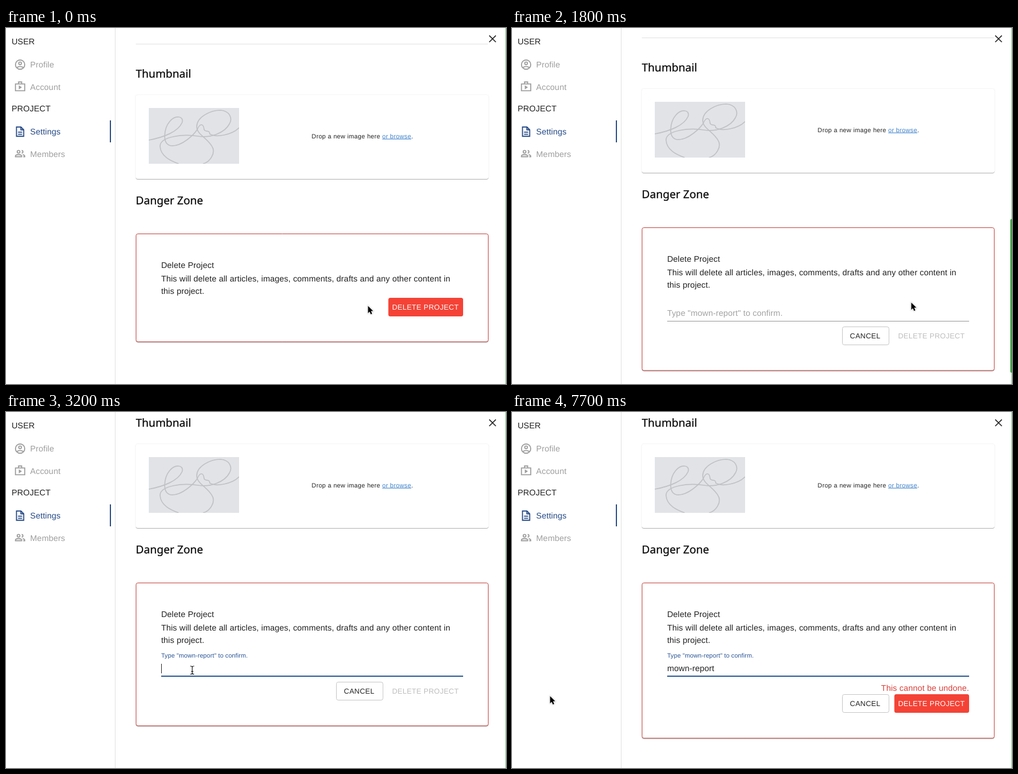
Recreate the animation shown at these times as an HTML page. Size 886x632 px, loop 8000 ms.

```html
<!DOCTYPE html>
<html lang="en">
<head>
<meta charset="utf-8">
<title>Project settings</title>
<style>
html, body { margin: 0; width: 100%; height: 100%; overflow: hidden; background: #fff; }
svg { display: block; width: 886px; height: 632px; }
text { font: 14.64px 'Liberation Sans', Arial, sans-serif; letter-spacing: .137px; fill: #212121; text-rendering: geometricPrecision; white-space: pre; }
.heading { font: 19.4px 'Noto Sans', 'Open Sans', sans-serif; letter-spacing: .05px; fill: #0c0c0c; stroke: #0c0c0c; stroke-width: .3; }
.caption { font-size: 10.98px; letter-spacing: .366px; }
.button { font-size: 12.81px; letter-spacing: .366px; }
.link { fill: #3f82cc; text-decoration: underline; }
.muted text { fill: #9e9e9e; }
.active text { fill: #264a86; }
.icon { fill: none; stroke: #9e9e9e; stroke-width: 2; }
.active .icon { stroke: #264a86; }
.paper { fill: #fff; filter: drop-shadow(0 1px 0 rgba(0,0,0,.28)) drop-shadow(0 .5px 1px rgba(0,0,0,.1)); }
.doodle { fill: none; stroke: #bfc1c5; stroke-width: 1.7; }

/* One shared 8 s timeline; values hold unless a keyframe sets an easing. */
.anim { animation: 8s step-end infinite; }
#page { animation-name: scroll; }
#thumb { animation-name: thumb; }
#danger { animation-name: grow; }
#actions { animation-name: drop; }
#delete { animation-name: delete; }
#deleteText { animation-name: deleteText; }
#ripple { animation-name: ripple; }
#confirm, #cancel { animation-name: confirm; }
#warning { animation-name: warning; fill: #d9403a; }
#label { animation-name: label; }
#line { animation-name: line; }
#focusLine { animation-name: focusLine; transform-origin: 542.5px 531px; }
#typing { animation-name: typing; }
#caret { animation-name: caret; }
#pointer { animation-name: pointer; animation-timing-function: linear; }
#arrow { animation-name: arrow; }
#beam { animation-name: beam; }

@keyframes scroll {
  0% { transform: none; }
  22.44% { transform: translateY(-11px); }
  23.07% { transform: translateY(-42px); }
  23.7%, 100% { transform: translateY(-62px); }
}
@keyframes thumb {
  0% { opacity: 0; transform: translateY(5px); }
  22.44% { opacity: 1; transform: translateY(5px); }
  23.07% { opacity: 1; transform: translateY(19px); }
  23.7% { opacity: 1; transform: translateY(28px); }
  29.3% { opacity: 1; transform: translateY(28px); animation-timing-function: linear; }
  32%, 100% { opacity: 0; transform: translateY(28px); }
}
@keyframes grow {
  0% { height: 191.5px; }
  13.1% { height: 253.5px; }
  89.95%, 100% { height: 275.5px; }
}
@keyframes drop {
  0% { transform: none; }
  13.1% { transform: translateY(62px); }
  89.95%, 100% { transform: translateY(84px); }
}
@keyframes delete {
  0% { fill: #f44336; fill-opacity: 1; }
  6.85% { fill: #f44336; fill-opacity: 1; animation-timing-function: ease-out; }
  8.7% { fill: #d32f2f; fill-opacity: 1; }
  13.1% { fill: #d32f2f; fill-opacity: 1; animation-timing-function: ease-out; }
  15.6% { fill: #f44336; fill-opacity: 0; }
  89.95% { fill: #f44336; fill-opacity: 0; animation-timing-function: ease-out; }
  92.5%, 100% { fill: #f44336; fill-opacity: 1; }
}
@keyframes deleteText {
  0% { fill: #fff; }
  13.1% { fill: #bdbdbd; }
  89.95%, 100% { fill: #fff; }
}
@keyframes ripple {
  0% { r: 0; opacity: 0; }
  10.6% { r: 4px; opacity: .1; animation-timing-function: linear; }
  12.5% { r: 23px; opacity: .2; animation-timing-function: linear; }
  13.09% { r: 33px; opacity: .22; }
  13.1%, 100% { r: 33px; opacity: 0; }
}
@keyframes confirm { 0% { opacity: 0; } 13.1%, 100% { opacity: 1; } }
@keyframes warning { 0% { opacity: 0; } 89.95%, 100% { opacity: 1; } }
@keyframes label {
  0% { transform: translate(274.9px, 510px); fill: #a2a2a2; }
  36.9% { transform: translate(274.9px, 510px); fill: #a2a2a2; animation-timing-function: cubic-bezier(0, 0, .2, 1); }
  39.3%, 100% { transform: translate(274.9px, 489.2px) scale(.75); fill: #2b5596; }
}
@keyframes line {
  0% { fill: #949494; }
  34% { fill: #949494; animation-timing-function: ease-out; }
  36% { fill: #222; }
  39.3%, 100% { fill: #949494; }
}
@keyframes focusLine {
  0% { transform: scaleX(0); }
  36.9% { transform: scaleX(0); animation-timing-function: cubic-bezier(0, 0, .2, 1); }
  39.3%, 100% { transform: none; }
}
@keyframes typing {
  0% { transform: none; }
  49.95% { transform: translateX(12.3px); }
  54.32% { transform: translateX(20.6px); }
  58.7% { transform: translateX(31.3px); }
  59.95% { transform: translateX(39.6px); }
  68.7% { transform: translateX(44.6px); }
  75.57% { transform: translateX(49.6px); }
  77.45% { transform: translateX(57.9px); }
  79.32% { transform: translateX(66.2px); }
  81.82% { transform: translateX(74.5px); }
  84.95% { transform: translateX(79.5px); }
  89.95%, 100% { transform: translateX(84.5px); }
}
@keyframes caret {
  0%, 44.95%, 66.8%, 74.95% { opacity: 0; }
  36.9%, 49.95%, 68.7%, 75.57% { opacity: 1; }
  96.2%, 100% { opacity: 0; }
}
@keyframes pointer {
  0%, 6.2% { transform: translate(641px, 493px); }
  8.7%, 29.3% { transform: translate(707px, 487px); animation-timing-function: ease-in; }
  32% { transform: translate(600px, 472px); animation-timing-function: ease-out; }
  35.6%, 40% { transform: translate(330px, 458px); animation-timing-function: ease-in-out; }
  44.3%, 100% { transform: translate(67px, 504px); }
}
@keyframes arrow {
  0%, 41.6% { opacity: 1; }
  32.5%, 54.32% { opacity: 0; }
  96.2%, 100% { opacity: 1; }
}
@keyframes beam { 0%, 41.6%, 100% { opacity: 0; } 32.5% { opacity: 1; } }
</style>
</head>
<body>
<svg viewBox="0 0 886 632">
  <defs>
    <clipPath id="buttonClip"><rect x="677.5" y="479" width="132.5" height="33" rx="3.5"/></clipPath>
    <clipPath id="imageClip"><rect x="253" y="142" width="160" height="99"/></clipPath>
  </defs>

  <g id="page" class="anim">
    <path d="M230 28.5H854" stroke="#e0e0e0"/>
    <text class="heading" x="230" y="88">Thumbnail</text>
    <rect class="paper" x="230" y="119" width="625" height="149" rx="3.7"/>
    <g clip-path="url(#imageClip)">
      <rect x="253" y="142" width="160" height="99" fill="#e1e3e7"/>
      <path class="doodle" d="M253 199C280 194 305 184 312 168C316 156 300 154 290 166C280 178 276 206 292 209C312 211 334 188 339 180C344 168 350 170 351 180C353 186 361 180 361 188C372 195 400 190 413 177"/>
      <path class="doodle" d="M349 241C362 238 371 222 366 212C358 195 338 190 338 175C338 158 362 146 380 146C396 147 402 160 396 170C388 186 362 196 340 192C315 188 273 192 273 210C274 228 292 236 306 241"/>
    </g>
    <text class="caption" x="541.6" y="195.6">Drop a new image here <tspan class="link">or browse</tspan>.</text>
    <text class="heading" x="230" y="313">Danger Zone</text>

    <rect id="danger" class="paper anim" x="230.5" y="365.5" width="624" height="191.5" rx="3.2" stroke="#c5433c"/>
    <text x="274.9" y="426.4">Delete Project</text>
    <text x="274.9" y="450.3">This will delete all articles, images, comments, drafts and any other content in</text>
    <text x="274.9" y="472.3">this project.</text>

    <g id="confirm" class="anim">
      <text x="274.9" y="522">mown-report</text>
      <g id="typing" class="anim">
        <rect x="274.5" y="507" width="100" height="21" fill="#fff"/>
        <rect id="caret" class="anim" x="275" y="509" width="1" height="17" fill="#222"/>
      </g>
      <text id="label" class="anim" y="12.4">Type "mown-report" to confirm.</text>
      <rect id="line" class="anim" x="275" y="531" width="535" height="1"/>
      <rect id="focusLine" class="anim" x="275" y="530" width="535" height="2" fill="#245590"/>
    </g>
    <text id="warning" class="anim" x="810" y="557" text-anchor="end">This cannot be undone.</text>

    <g id="actions" class="anim">
      <g id="cancel" class="anim">
        <rect x="585.5" y="479.5" width="82.5" height="32" rx="3.2" fill="#fff" stroke="#c4c4c4"/>
        <text class="button" x="598.8" y="500.2">CANCEL</text>
      </g>
      <rect id="delete" class="anim" x="677.5" y="479" width="132.5" height="33" rx="3.5"/>
      <g clip-path="url(#buttonClip)"><circle id="ripple" class="anim" cx="707" cy="489" fill="#fff"/></g>
      <text id="deleteText" class="button anim" x="684.2" y="500.2">DELETE PROJECT</text>
    </g>
  </g>

  <rect width="193" height="632" fill="#fff"/>
  <path d="M193.5 0V632" stroke="#e0e0e0"/>
  <text x="9.9" y="29">USER</text>
  <g class="muted">
    <g class="icon" transform="translate(14 54) scale(.915)">
      <circle cx="12" cy="12" r="9"/><circle cx="12" cy="9.5" r="2.6"/><path d="M5.8 18.2C8 15 16 15 18.2 18.2"/>
    </g>
    <text x="42.8" y="70.3">Profile</text>
    <g class="icon" transform="translate(14 93) scale(.915)">
      <path d="M3 7H21V20H3ZM9 7V3H15V7"/><path d="M9.5 9.5V17.5L15.5 13.5Z" fill="#9e9e9e" stroke="none"/>
    </g>
    <text x="42.8" y="109.7">Account</text>
  </g>
  <text x="9.9" y="148.3">PROJECT</text>
  <g class="active">
    <g class="icon" transform="translate(14 173) scale(.915)">
      <path d="M5 3H13.6L19 8.4V21H5ZM13.5 3V8.5H19M8 13H16M8 17H16"/>
    </g>
    <text x="42.8" y="189.3">Settings</text>
    <rect x="184" y="164" width="2" height="39" fill="#264a86"/>
  </g>
  <g class="muted">
    <g class="icon" transform="translate(14 212) scale(.915)">
      <circle cx="9" cy="8.5" r="2.6"/><path d="M3 18V16.8C3 13 15 13 15 16.8V18ZM15 6A2.5 2.5 0 0 1 15 11M17 14C19.5 14.5 21 15.5 21 17V18H18"/>
    </g>
    <text x="42.8" y="228.7">Members</text>
  </g>

  <path d="M856.3 13.3L868 25M868 13.3L856.3 25" stroke="#222" stroke-width="1.7"/>
  <rect x="885" width="1" height="632" fill="#82c785"/>
  <rect id="thumb" class="anim" x="883" y="334" width="6" height="273" rx="2.5" fill="#43a047"/>

  <g id="pointer" class="anim">
    <path id="arrow" class="anim" d="M.5 .5V13.2L3.4 10.5L5.4 15.2L7.7 14.2L5.7 9.6H9.6Z" fill="#000" stroke="#fff" stroke-width="1.6" paint-order="stroke" style="filter:drop-shadow(0 .8px .8px rgba(0,0,0,.3))"/>
    <path id="beam" class="anim" d="M-3.5 -7C-1 -7 0 -6.4 0 -5C0 -6.4 1 -7 3.5 -7M0 -5V5.5M-3.5 7.5C-1 7.5 0 6.9 0 5.5C0 6.9 1 7.5 3.5 7.5M-2 2.5H2" fill="none" stroke="#111" stroke-width="1.2"/>
  </g>
</svg>
</body>
</html>
```
